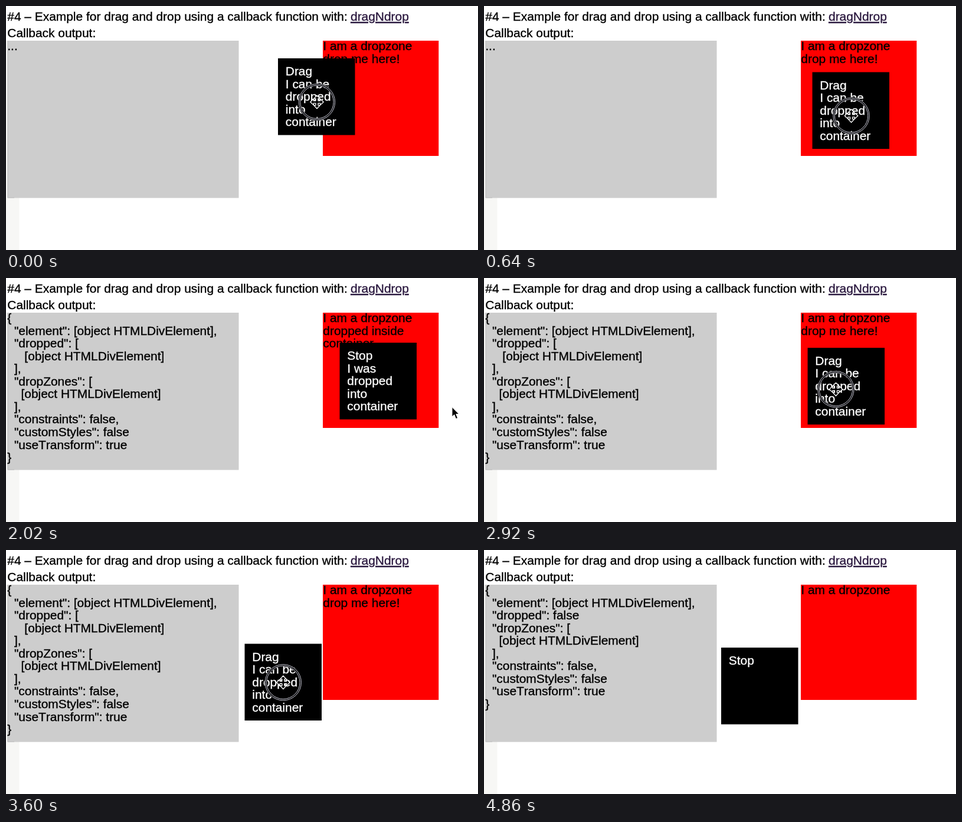
Recreate the animation shown at these times as an HTML page. Size 800 by 415 pixels, loop 4.88 s.

```html
<!DOCTYPE html>
<html lang="en">
<head>
<meta charset="utf-8">
<title>Drag and drop with callback</title>
<style>
  html, body { margin: 0; width: 100%; height: 100%; overflow: hidden; background: #fff; }
  svg { display: block; width: 100vw; height: 100vh; }
  text {
    font: 20.92px "Liberation Sans", Arial, sans-serif; white-space: pre; font-kerning: none;
    fill: var(--ink, #000); stroke: var(--ink, #000); stroke-width: .35px;
  }
  .link { --ink: #2c1a40; text-decoration: underline; }
  #label { --ink: #fff; }
</style>
</head>
<body>
<svg viewBox="0 0 800 415" xmlns="http://www.w3.org/2000/svg">
  <rect y="59" width="22.5" height="356" fill="#f7f7f5"/>
  <text x="2.3" y="25">#4 – Example for drag and drop using a callback function with: </text>
  <text class="link" x="584" y="25">dragNdrop</text>
  <text x="2.3" y="53">Callback output:</text>

  <rect x="2.5" y="59" width="392" height="267.5" fill="#cdcdcd"/>
  <path d="M3 59V326H14" fill="none" stroke="#bbb"/>
  <g id="output"></g>

  <rect x="537" y="59" width="196.3" height="196" fill="#f00"/>
  <g id="zone"></g>

  <g id="box">
    <rect width="130.5" height="130.5"/>
    <g id="label"></g>
  </g>

  <g id="cursor">
    <g id="ring" fill="none">
      <circle r="29.5" stroke="#000" stroke-width="4.5"/>
      <circle r="30.6" stroke="#c9c9d6"/>
      <circle r="28.2" stroke="#c9c9d6"/>
    </g>
    <g id="move" stroke="#fff" stroke-width="1.3">
      <path id="cross"/>
    </g>
    <path id="arrow" d="M0 0V16.6L3.8 13L6.6 20L9.6 18.8L6.8 12H11.8Z" stroke="#fff"/>
  </g>
</svg>
<script>
const LOOP = 4880, LINE = 21.55;
const DROP1 = 1180, LEAVE = 1700, ENTER = 2500, GRAB = 2740, DROP2 = 3900, GONE = 4420;
const LAG = 70; // the box trails the hand during the second drag
const $ = id => document.getElementById(id);

const report = dropped => [
  '{',
  '  "element": [object HTMLDivElement],',
  ...dropped,
  '  "dropZones": [',
  '    [object HTMLDivElement]',
  '  ],',
  '  "constraints": false,',
  '  "customStyles": false',
  '  "useTransform": true',
  '}'
];
const waiting = ['...'];
const inside = report(['  "dropped": [', '     [object HTMLDivElement]', '  ],']);
const outside = report(['  "dropped": false']);

const dragging = {
  zone: ['I am a dropzone', 'drop me here!'],
  label: ['Drag', 'I can be', 'dropped', 'into', 'container']
};
const landed = {
  zone: ['I am a dropzone', 'dropped inside', 'container'],
  label: ['Stop', 'I was', 'dropped', 'into', 'container']
};
const missed = { zone: ['I am a dropzone'], label: ['Stop'] };

function ease(t, from, to) {
  const u = Math.min(1, Math.max(0, (t - from) / (to - from)));
  return u * u * (3 - 2 * u);
}
const mix = (a, b, k) => a + (b - a) * k;

// bend below 1 lets y run ahead of x, which curves the path
const moves = [
  { from: 0, to: 500, x: 556.5, y: 112.5 },
  { from: 680, to: 1060, x: 565.5, y: 110 },
  { from: 2780, to: 3480, x: 404.5, y: 159.5, bend: 0.77 },
  { from: 3620, to: 3770, x: 402, y: 166 }
];

function boxAt(t) {
  let x = 461, y = 89;
  for (const m of moves) {
    const k = ease(t, m.from, m.to);
    x = mix(x, m.x, k);
    y = mix(y, m.y, k ** (m.bend || 1));
  }
  return [x, y];
}

function cursorAt(t) {
  const second = t > ENTER - 400;
  const [x, y] = boxAt(second ? t + LAG : t);
  const out = second ? 1 - ease(t, 2240, 2640) : ease(t, 1640, 1920);
  return [mix(x + 66, 756, out), mix(y + (second ? 64 : 74.3), 219.5, out)];
}

function place(id, [x, y]) {
  $(id).setAttribute('transform', `translate(${x.toFixed(2)} ${y.toFixed(2)})`);
}

function setLines(id, lines, x, y) {
  const el = $(id);
  if (el.lines === lines) return;
  el.lines = lines;
  el.innerHTML = lines.map((s, i) => `<text x="${x}" y="${y + i * LINE}">${s}</text>`).join('');
}

function show(id, on) {
  $(id).setAttribute('visibility', on ? 'visible' : 'hidden');
}

// One arm of the four-way arrow, turned four times
function crossPath() {
  const arm = [[-2, -2.2], [-2, -5.6], [-5.2, -5.6], [0, -11.2], [5.2, -5.6], [2, -5.6], [2, -2.2]];
  const turns = [p => p, ([x, y]) => [-y, x], ([x, y]) => [-x, -y], ([x, y]) => [y, -x]];
  return 'M' + turns.flatMap(turn => arm.map(p => turn(p).join(' '))).join('L') + 'Z';
}
$('cross').setAttribute('d', crossPath());

function draw(t) {
  const held = t < DROP1 || (t >= GRAB && t < DROP2);
  const away = t >= LEAVE && t < ENTER;
  const state = held ? dragging : t < GRAB ? landed : missed;
  setLines('output', t < DROP1 ? waiting : t < DROP2 ? inside : outside, 2.3, 75);
  setLines('zone', state.zone, 537.3, 75);
  setLines('label', state.label, 12.8, 29);
  place('box', boxAt(t));
  place('cursor', cursorAt(t));
  show('ring', held);
  show('move', !away && t < GONE);
  show('arrow', away);
}

const start = performance.now();
function tick() {
  draw((performance.now() - start) % LOOP);
  requestAnimationFrame(tick);
}
tick();
</script>
</body>
</html>
```
